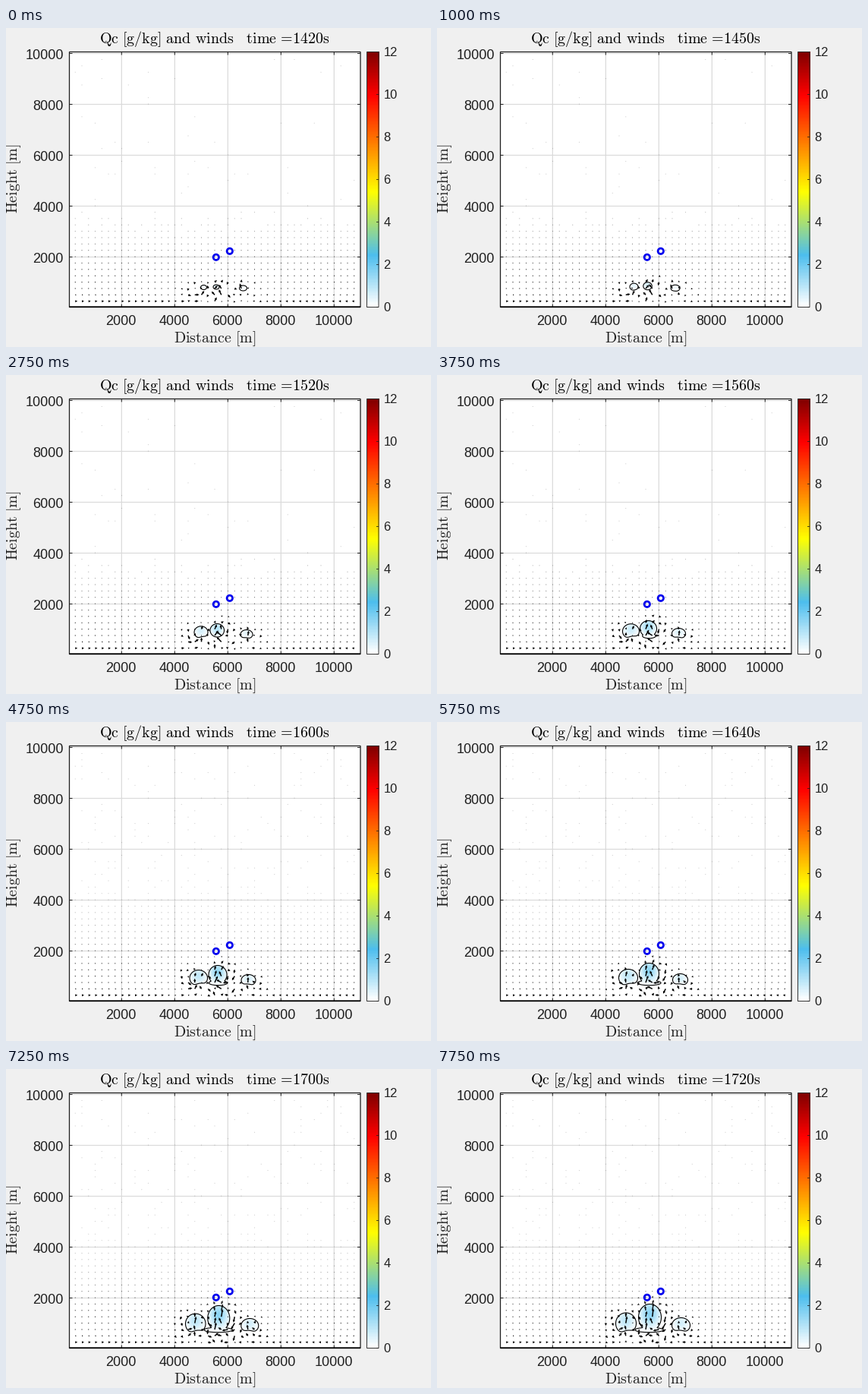
Write a matplotlib script that moves like this. It is 560 px wide and 420 px high and loops after 8 s.

```python
import numpy as np
import matplotlib.pyplot as plt
from matplotlib.animation import FuncAnimation
from matplotlib.colors import LinearSegmentedColormap
from matplotlib.patches import Circle, Rectangle

W, H, DPI = 560, 420, 100
FRAMES, INTERVAL = 32, 250
LEFT, RIGHT, TOP, BOTTOM = 83, 466.5, 31, 367
INK = "#202020"
PT = 72 / DPI  # points per pixel

plt.rcParams["font.family"] = "Liberation Sans"
plt.rcParams["mathtext.fontset"] = "cm"
plt.rcParams["path.snap"] = False

fig = plt.figure(figsize=(W / DPI, H / DPI), dpi=DPI, facecolor="#f0f0f0")
ax = fig.add_axes([0, 0, 1, 1])
ax.set_axis_off()
# Whole numbers are pixel centres
ax.set_xlim(-0.5, W - 0.5)
ax.set_ylim(H - 0.5, -0.5)
ax.autoscale(False)


def line(x0, y0, x1, y1, color=INK, width=1.0, z=5):
    ax.plot([x0, x1], [y0, y1], color=color, lw=width * PT, zorder=z,
            solid_capstyle="butt")


def label(x, y, text, size, ha="center", **kw):
    return ax.text(x, y, text, fontsize=size * PT, ha=ha, va="baseline", **kw)


def roman(text):
    """Upright Computer Modern with plain text spacing."""
    text = text.replace("=", r"\hspace{-0.2}=\hspace{-0.2}")
    return r"$\mathrm{" + text.replace(" ", r"\hspace{0.34}") + "}$"


# Axes box, grid and ticks
ax.add_patch(Rectangle((LEFT, TOP), RIGHT - LEFT, BOTTOM - TOP, fc="white",
                       ec="none", zorder=0))
for metres in range(2000, 10001, 2000):
    x = 81.8 + metres * 0.035
    y = round(368 - metres * 0.0335)
    line(x, TOP, x, BOTTOM, "#dadada", 1.2, z=1)
    line(LEFT, y, RIGHT, y, "#dadada", 1.2, z=1)
    for x0, x1 in ((LEFT, LEFT + 4), (RIGHT - 4, RIGHT)):
        line(x0, y, x1, y)
    for y0, y1 in ((TOP, TOP + 4), (BOTTOM - 4, BOTTOM)):
        line(x, y0, x, y1)
    label(x - 0.5, 391, str(metres), 18, color=INK)
    label(75.5, y + 7.5, str(metres), 18, "right", color=INK)
ax.add_patch(Rectangle((LEFT, TOP), RIGHT - LEFT, BOTTOM - TOP, fc="none",
                       ec=INK, lw=1.3 * PT, zorder=5))
line(LEFT, BOTTOM - 0.3, RIGHT, BOTTOM - 0.3, "black", 1.7)
label(274.5, 414, roman("Distance [m]"), 20, color=INK)
label(21.5, 198, roman("Height [m]"), 20, color=INK, rotation=90).set(
    ha="right", va="center")
title = label(274.5, 20, "", 20, color="black")

# Colour scale
cmap = LinearSegmentedColormap.from_list("water", [
    (0, "white"), (0.2, "#4dbeee"), (0.45, "yellow"), (0.83, "red"),
    (1, "#800000")])
ax.imshow(np.linspace(1, 0, 256)[:, None], cmap=cmap, aspect="auto",
          extent=(475, 490.5, BOTTOM, TOP), zorder=2)
ax.add_patch(Rectangle((475, TOP), 15.5, BOTTOM - TOP, fc="none", ec=INK,
                       lw=0.9 * PT, zorder=5))
for v in range(0, 13, 2):
    y = BOTTOM - 28 * v
    line(487.5, y, 490.5, y, width=0.8)
    label(497, y + 6, str(v), 16.5, "left", color=INK)

rings = [Circle((x, 0), 3.7, fc="none", ec="#0000ee", lw=2.7 * PT, zorder=8)
         for x in (276.3, 294.3)]
for ring in rings:
    ax.add_patch(ring)

# Clouds: centre x, centre y, half width, half height at each key step
KEYS = [0, 6, 14, 22, 30]
CLOUDS = np.array([
    [(260, 341, 4, 3), (258, 339.5, 7, 6.2), (255, 337, 11, 9.8),
     (251.5, 336.3, 12.5, 11.3), (248.5, 334.5, 13.5, 14)],
    [(276.5, 340.5, 4, 3), (277.5, 338, 7.5, 7), (278, 333.5, 11, 10.5),
     (279, 331, 13, 14), (280, 326.5, 15, 17.5)],
    [(312, 342, 5, 3.5), (315, 342, 7, 5), (318, 340, 9, 7),
     (320, 339, 10, 8), (321, 337, 12, 10)]])
cx, cy = np.meshgrid(np.arange(225, 342, 0.5), np.arange(300, 356, 0.5))
fill = ax.imshow(np.zeros(cx.shape + (4,)), aspect="auto", zorder=2,
                 extent=(224.75, 341.75, 355.75, 299.75))
outline = []


def cloud_params(k):
    return [[np.interp(k, KEYS, part) for part in c.T] for c in CLOUDS]


def cloud_field(k, params):
    """Positive inside the clouds, and the water content there."""
    inside = np.full(cx.shape, -9.0)
    water = np.zeros(cx.shape)
    for (x, y, rx, ry), peak in zip(params, (0.9, 1.6, 0.6)):
        blob = 1 - ((cx - x) / rx) ** 2 - ((cy - y) / ry) ** 2
        inside = np.maximum(inside, blob)
        core = np.exp(-((cx - x) / rx) ** 2 * 1.6
                      - ((cy - y + ry * 0.25) / ry) ** 2 * 1.4)
        water = np.maximum(water, peak * min(1, 0.3 + k / 28) * core)
    grow = np.clip((k - 13) / 13, 0, 1)
    if grow > 0:
        base = 1 - ((cx - 279) / (8 + 11 * grow)) ** 2 - ((cy - 343) / 3.2) ** 2
        inside = np.maximum(inside, base)
    for i, shift in ((0, 2), (2, -1)):
        x, y, rx, ry = params[i]
        notch = np.exp(-((cx - x - shift) / (rx * 0.5)) ** 2
                       - ((cy - y - ry) / (ry * 0.5)) ** 2)
        inside = inside - 0.9 * min(1, k / 14) * notch
    return np.minimum(inside, (347 - cy) / 4), water


# Winds on a 250 m grid
col, row = np.meshgrid(np.arange(1, 44), np.arange(1, 40))
gx, gy = 82 + 8.75 * col, 367.6 - 8.375 * row
gz = 367.6 - gy
rng = np.random.default_rng(7)
chance = rng.random(gx.shape)
phase = rng.uniform(0, 2 * np.pi, gx.shape)
winds = ax.quiver(gx, gy, np.zeros(gx.shape), np.zeros(gx.shape),
                  units="dots", scale_units="dots", scale=1, width=1.5,
                  headwidth=2.2, headlength=2.2, headaxislength=2.2,
                  minlength=0.85, zorder=4)


def wind_field(k, params):
    u = 5.4 * np.tanh((283 - gx) / 45) * np.exp(-gz / 14)
    w = np.zeros(gx.shape)
    strengths = (6 + k / 7, 7 + k / 5, 5 + k / 30)
    for (x, y, rx, ry), s in zip(params, strengths):
        a, b = rx * 0.6 + 9, ry * 0.7 + 9
        dx, dz = gx - x, y - gy
        g = s * np.exp(-(dx / a) ** 2 - (dz / b) ** 2)
        u += 2 * dx * dz / b ** 2 * g
        w += (1 - 2 * (dx / a) ** 2) * g
    # Thermals rising from the ground
    w += 6 * np.exp(-((gx - 276) / 7) ** 2 - ((gz - 16) / 10) ** 2)
    stir = 5 * np.exp(-((gx - 279) / 48) ** 2 - ((gz - 18) / 19) ** 2)
    u += stir * np.cos(phase + k / 14)
    w += stir * np.sin(phase + k / 14) * np.clip(gz / 14, 0, 1)
    return u, w


def dot_colors(k):
    alpha = np.clip(np.exp(-np.clip(gz - 45, 0, None) / 60), 0.2, 1)
    reach, sparse = (130, 0.05) if k < 15 else (160, 0.16)
    shown = chance < np.clip((reach - gz) / 35, sparse, 1)
    rgba = np.zeros((gx.size, 4))
    rgba[:, 3] = np.where(shown, alpha, 0).ravel()
    return rgba


def update(frame):
    k = max(0, frame - 1)
    title.set_text(roman(f"Qc [g/kg] and winds   time ={1420 + 10 * k}s"))
    params = cloud_params(k)
    inside, water = cloud_field(k, params)
    rgba = cmap(water / 12)
    rgba[..., 3] = inside > 0
    fill.set_data(rgba)
    while outline:
        outline.pop().remove()
    outline.append(ax.contour(cx, cy, inside, levels=[0], colors="black",
                              linewidths=1.1 * PT, zorder=3))
    winds.set_UVC(*wind_field(k, params))
    winds.set_facecolor(dot_colors(k))
    lift = 1 if k >= 24 else 0
    for ring, y in zip(rings, (301.3, 293.3)):
        ring.center = (ring.center[0], y - lift)
    return []


anim = FuncAnimation(fig, update, frames=FRAMES, interval=INTERVAL,
                     init_func=lambda: [], repeat=True, repeat_delay=0, blit=False)
plt.show()
```
